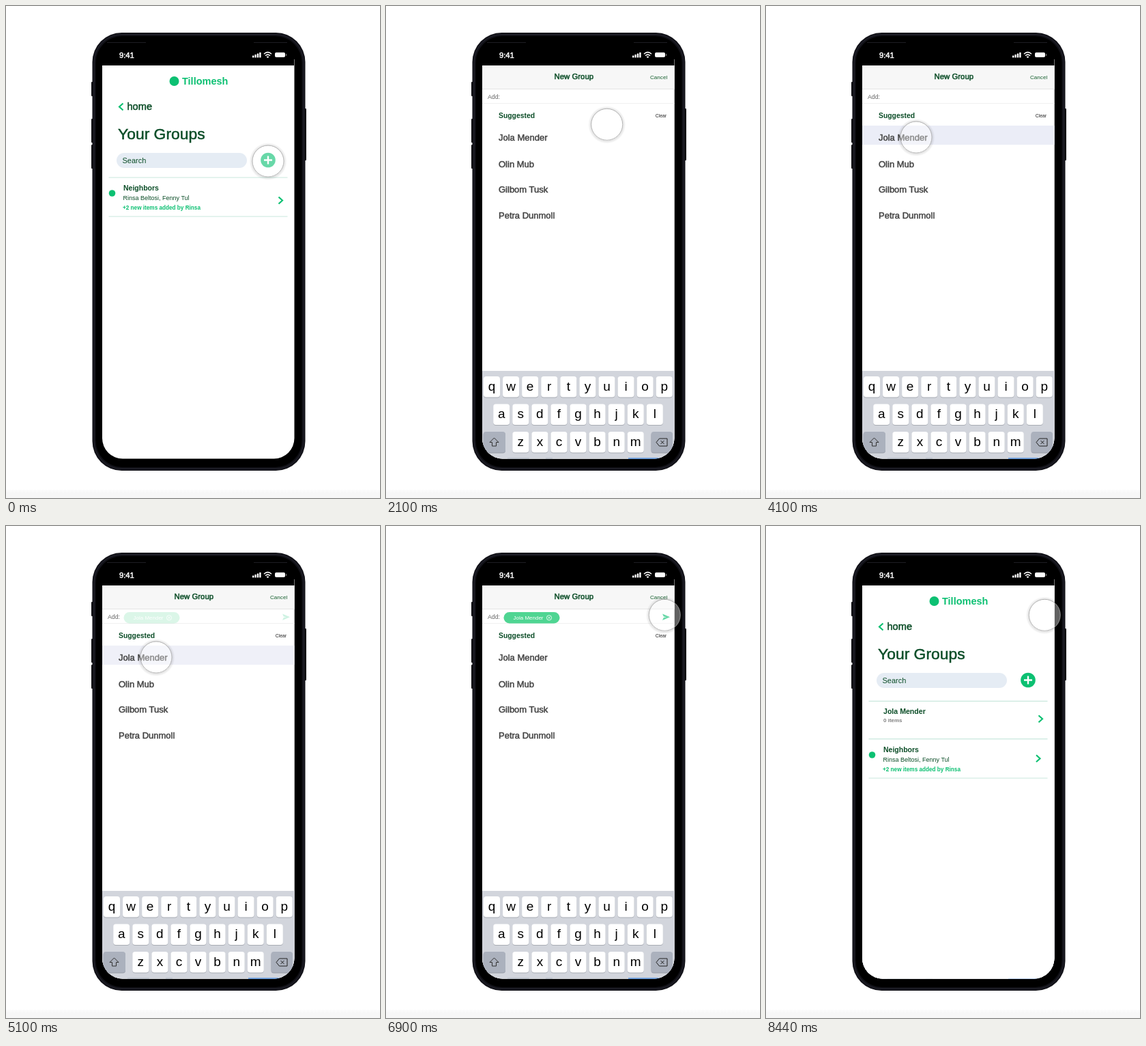
An HTML page that plays this animation: 548x720 px, repeating every 8.68 s.

```html
<!DOCTYPE html>
<html lang="en">
<head>
<meta charset="utf-8">
<title>Shared list prototype</title>
<style>
  html, body { margin: 0; width: 100%; height: 100%; overflow: hidden; background: #fff; }
  svg { display: block; width: 548px; height: 720px; }
  text { font-family: "Liberation Sans", Arial, sans-serif; }
  .bold { font-weight: bold; }
  .medium { stroke: currentColor; stroke-width: .5px; }
</style>
</head>
<body>
<svg viewBox="0 0 548 720" xmlns="http://www.w3.org/2000/svg">
  <defs>
    <clipPath id="screenClip"><path d="M141 87H422.500V632.500a30 30 0 0 1-30 30H171a30 30 0 0 1-30-30Z"/></clipPath>
    <radialGradient id="shadow">
      <stop offset=".83" stop-color="#000" stop-opacity="0"/>
      <stop offset=".84" stop-color="#000" stop-opacity=".12"/>
      <stop offset="1" stop-color="#000" stop-opacity="0"/>
    </radialGradient>
    <linearGradient id="strip" x2="0" y2="1">
      <stop stop-color="#fcfcfc"/><stop offset=".4" stop-color="#f7f7f7"/>
    </linearGradient>
  </defs>
  <rect y="708" width="548" height="12" fill="url(#strip)"/>
  <g id="phone"></g>
  <g clip-path="url(#screenClip)">
    <g id="before"></g>
    <g id="compose"></g>
    <g id="after"></g>
  </g>
  <g id="cursor">
    <circle r="27.500" cy=".5" fill="url(#shadow)"/>
    <circle r="23" fill="#fff" fill-opacity=".38" stroke="#a8a8a8" stroke-width=".8"/>
  </g>
</svg>
<script>
const LOOP = 8680;
const GREEN = '#0cc072', DARK = '#0b4d27';
const $ = id => document.getElementById(id);

const rect = (x, y, w, h, fill, r = 0, extra = '') =>
  `<rect x="${x}" y="${y}" width="${w}" height="${h}" rx="${r}" fill="${fill}" ${extra}/>`;
const label = (x, y, size, fill, str, cls = '', extra = '') =>
  `<text x="${x}" y="${y}" font-size="${size}" fill="${fill}" color="${fill}" class="${cls}" ${extra}>${str}</text>`;
const line = (d, stroke, width = 1) =>
  `<path d="${d}" fill="none" stroke="${stroke}" stroke-width="${width}"/>`;
const rule = y => line(`M150.500 ${y}H412.500`, '#c9e8dd', 1.2);
const chevron = (x, y, dir = 1) =>
  line(`M${x - 2.5 * dir} ${y - 5}l${5.5 * dir} 5l${-5.5 * dir} 5`, GREEN, 2.2);

function phone() {
  const side = [[125, 111, 21], [125, 165, 35], [125, 203, 35], [437, 150, 76]]
    .map(([x, y, h]) => rect(x, y, 3, h, '#0d0d12', 1)).join('');
  const bars = [3, 4.5, 6, 7.5]
    .map((h, i) => rect(361 + i * 3.4, 75.5 - h, 2.4, h, '#fff', .5)).join('');
  const wifi = line('M378 70.300Q383.500 65 389 70.300M380 72.700Q383.500 69.500 387 72.700', '#fff', 1.5) +
    '<path d="M381.500 74.300Q383.500 72.600 385.500 74.300L383.500 76.300Z" fill="#fff"/>';
  const battery = rect(394, 68, 15, 7, '#fff', 2) + rect(410, 70, 1.200, 3, '#888', .5);
  return side +
    rect(126.500, 39, 312, 641, '#111117', 43) +
    rect(129, 41.500, 307, 636, 'none', 41, 'stroke="#24242e" stroke-width="1"') +
    rect(131.500, 44, 302, 631, '#000', 39) +
    line('M148 53.500H205M363 53.500H412', '#26262c', .8) +
    line('M422.500 78V87', '#999', .8) +
    label(166, 76, 11.200, '#fff', '9:41', 'medium') + bars + wifi + battery;
}

function neighbors(dy, arrowX, arrowY) {
  return `<circle cx="155.500" cy="${274 + dy}" r="4.800" fill="${GREEN}"/>` +
    label(172, 269.500 + dy, 10.500, DARK, 'Neighbors', 'bold') +
    label(171.500, 283.500 + dy, 9, DARK, 'Rinsa Beltosi, Fenny Tul') +
    label(171, 298 + dy, 8.200, GREEN, '+2 new items added by Rinsa', 'bold') +
    chevron(arrowX, arrowY);
}

function groups(list) {
  return rect(141, 87, 282, 577, '#fff') +
    `<circle cx="246.500" cy="110" r="7" fill="${GREEN}"/>` +
    label(258, 115, 14.500, GREEN, 'Tillomesh', 'bold') +
    chevron(169, 147.500, -1) +
    label(177.500, 152.300, 14.600, DARK, 'home', 'medium') +
    label(164, 195.300, 22.900, DARK, 'Your Groups', 'medium') +
    rect(162, 215, 191, 22, '#e5ecf4', 11) +
    label(170.500, 230.200, 11, DARK, 'Search') +
    `<circle cx="384" cy="225.500" r="10.800" fill="${GREEN}"/>` +
    line('M378 225.500h12M384 219.500v12', '#fff', 2.4) + list;
}

function keyboard() {
  const key = (x, y, ch) =>
    rect(x - 12, y + 1, 24, 30.500, '#a8acb4', 4) + rect(x - 12, y, 24, 30.500, '#fff', 4) +
    label(x, y + 20.500, 19, '#000', ch, '', 'text-anchor="middle"');
  const row = (str, x, y) => [...str].map((ch, i) => key(x + i * 28.08, y, ch)).join('');
  const wide = (x, w) => rect(x, 624, w, 30.500, '#979ca6', 4) + rect(x, 623, w, 30.500, '#abb1bd', 4);
  return rect(141, 534, 282, 130, '#d2d5dc') +
    row('qwertyuiop', 155, 542) + row('asdfghjkl', 169.200, 582.500) + row('zxcvbnm', 197.300, 623) +
    wide(142.500, 32.500) + wide(388.500, 31.500) +
    line('M158.500 632l6.500 6.500h-3.500v5.500h-6v-5.500h-3.500Z', '#333', 1) +
    line('M396 638.500l4.500-5.500h11.500v11h-11.500ZM402.500 636l5 5m0-5l-5 5', '#222', 1) +
    rect(178, 661.500, 32, 3, '#aeb4bf') + rect(234, 661.500, 10, 3, '#aeb4bf') +
    rect(355, 661.500, 65, 3, '#1673e6');
}

function compose() {
  const people = [['Jola Mender', 196.600], ['Olin Mub', 236.300], ['Gilbom Tusk', 272.500], ['Petra Dunmoll', 311]];
  return rect(141, 87, 282, 577, '#fff') +
    rect(141, 87, 282, 34.500, '#f7f7f7') +
    line('M141 121.500H423', '#e4e4e4') + line('M141 142.500H423', '#f0f0f0') +
    label(246.500, 106.800, 11.400, DARK, 'New Group', 'medium') +
    label(387, 107.300, 8.100, '#17602f', 'Cancel') +
    label(149, 136, 8.750, '#666', 'Add:') +
    label(165, 164.300, 10.400, DARK, 'Suggested', 'bold') +
    label(394.700, 163, 6.900, '#222', 'Clear') +
    `<g id="hover">${rect(141, 175, 282, 28, '#ebedf7')}</g>` +
    people.map(([name, y]) => label(165, y, 13, '#444', name, 'medium')).join('') +
    `<g id="chip">${rect(172.500, 126, 82, 16.500, '#4fd592', 8.250)}` +
    label(186.500, 137, 8, '#fff', 'Jola Mender') +
    '<circle cx="239" cy="134.300" r="3.600" fill="none" stroke="#fff" stroke-width=".8"/>' +
    line('M237.500 132.800l3 3m0-3l-3 3', '#fff', .8) +
    `<path d="M405 128.500l11 4.700l-11 4.700l1.800-3.900l4-.8l-4-.8Z" fill="${GREEN}"/></g>` +
    keyboard();
}

$('phone').innerHTML = phone();
$('before').innerHTML = groups(rule(251) + neighbors(0, 402, 284.500) + rule(308));
$('compose').innerHTML = compose();
$('after').innerHTML = groups(
  rule(256.300) + label(172, 274.700, 10.600, DARK, 'Jola Mender', 'bold') +
  label(172, 286.500, 8, '#808080', '0 items', 'bold') + chevron(402, 282.300) +
  rule(311.700) + neighbors(61, 398.500, 340.300) + rule(369));

const ramp = (t, from, to) => Math.min(1, Math.max(0, (t - from) / (to - from)));
const ease = p => p * p * (3 - 2 * p);

// Each move: start, end, destination.
const start = [384, 227];
const moves = [
  [200, 900, [384, 222]],
  [1600, 2550, [272.500, 132]],
  [2950, 3650, [220, 192]],
  [5200, 6430, [408.300, 130.300]]
];

function cursorAt(t) {
  let [x, y] = start;
  for (const [from, to, [tx, ty]] of moves) {
    const p = ease(ramp(t, from, to));
    x += (tx - x) * p;
    y += (ty - y) * p;
  }
  return [x, y];
}

function draw(t) {
  const picked = ramp(t, 4920, 5820);
  $('compose').setAttribute('opacity', ramp(t, 1020, 1920));
  $('hover').setAttribute('opacity', ramp(t, 3700, 4000) * (1 - picked));
  $('chip').setAttribute('opacity', picked);
  $('after').setAttribute('opacity', ramp(t, 6930, 7890));
  $('cursor').setAttribute('transform', `translate(${cursorAt(t)})`);
}

const origin = performance.now();
function tick() {
  draw((performance.now() - origin) % LOOP);
  requestAnimationFrame(tick);
}
tick();
</script>
</body>
</html>
```
